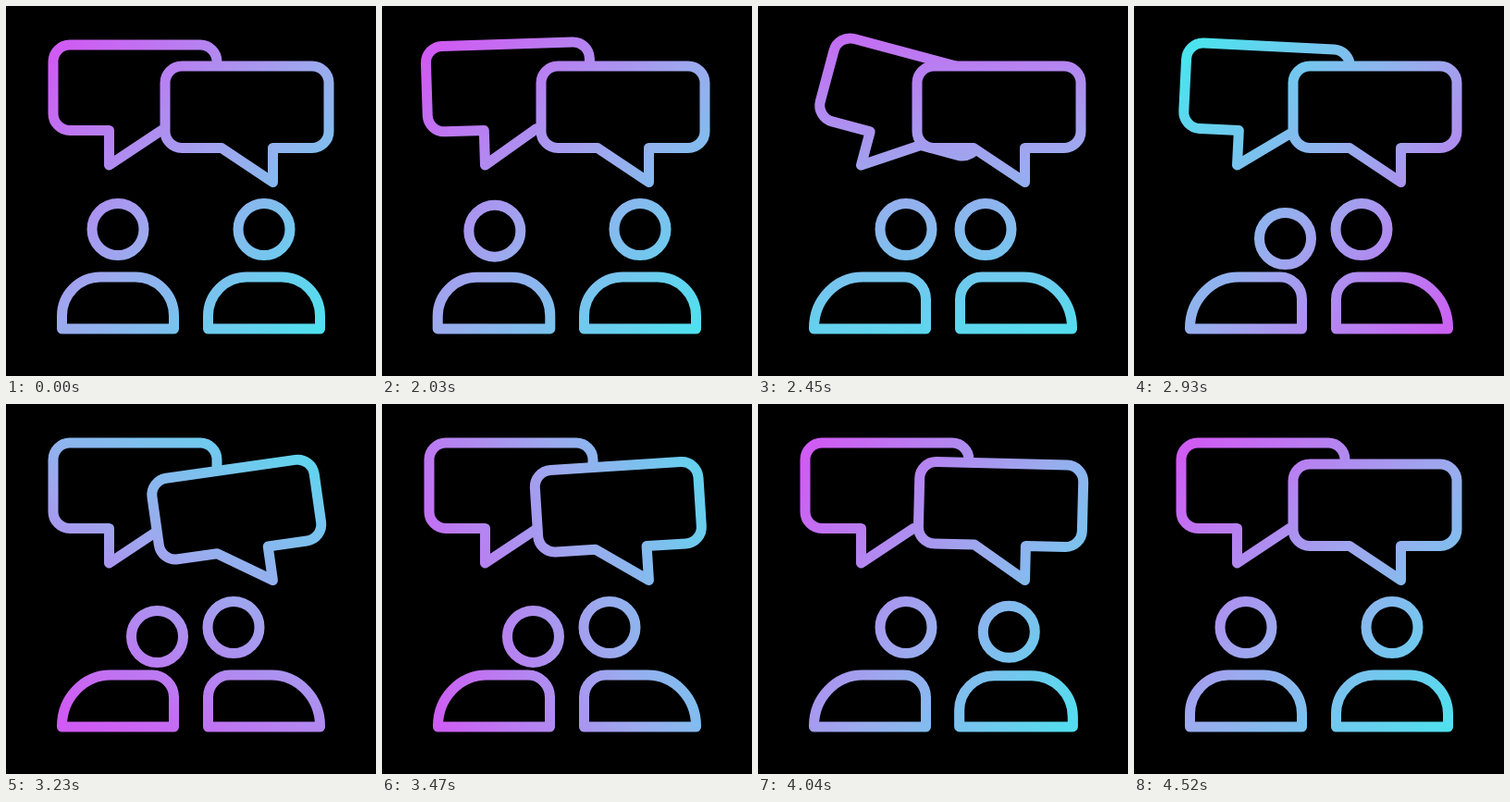
Write an HTML page without scripts that moves like this. It is 400x400 px and loops after 4550 ms.

```html
<!DOCTYPE html>
<html lang="en">
<head>
<meta charset="utf-8">
<title>Conversation</title>
<style>
  html, body { margin: 0; width: 100%; height: 100%; overflow: hidden; background: #000; }
  svg { display: block; width: 100%; height: 100%; }

  .lines { fill: #000; stroke: #fff; stroke-width: 11; stroke-linecap: round; stroke-linejoin: round; }
  .lines *, .sheen { animation: 4.55s cubic-bezier(.37, 0, .63, 1) infinite backwards; }

  .sheen { rotate: 45deg; animation-name: turn; animation-timing-function: cubic-bezier(.38, 0, .3, 1); }

  .bubble { animation-name: swing; }
  .first { transform-origin: 111px 172px; }
  .second { transform-origin: 289px 191px; animation-delay: 1.15s; }

  .head, .body { transform-origin: 121px 349px; }
  .head { --lean: 39px; --dip: translateY(5.6px); }
  .right .head { --lean: 33px; }
  .body {
    --lean: 0px;
    --dip: scale(1.016, .985);
    --upright: path("M60.5 349V335C60.5 312 79 293 102 293H140C163 293 181.5 312 181.5 335V349Z");
    --leaned: path("M60.5 349V348C60.5 318 84 293 113 293H158C171 293 181.5 304 181.5 317V349Z");
    d: var(--upright);
  }
  .left .head, .left .body { animation-name: lean-left, dip-left; }
  .right .head, .right .body { animation-name: lean-right, dip-right; }
  .nod { animation-name: nod; }

  @keyframes turn {
    0%, 43.96% { rotate: 45deg; }
    98.9%, 100% { rotate: 405deg; }
  }
  @keyframes swing {
    0%, 43.74% { rotate: 0deg; }
    48.35% { rotate: -20.5deg; }
    53.85% { rotate: 15deg; }
    59.34% { rotate: -9deg; }
    64.84% { rotate: 3deg; }
    69.23%, 100% { rotate: 0deg; }
  }
  @keyframes lean-left {
    0%, 43.74%, 98.46%, 100% { translate: 0px; d: var(--upright); }
    53.19%, 89.23% { translate: var(--lean); d: var(--leaned); }
  }
  @keyframes lean-right {
    0%, 44.62%, 91.65%, 100% { translate: 0px; d: var(--upright); }
    53.63%, 82.86% { translate: var(--lean); d: var(--leaned); }
  }
  /* Half a sine arch: slow down into the dip, speed up out of it. */
  @keyframes dip-left {
    0%, 43.74%, 53.19%, 89.23%, 98.46%, 100% { transform: none; animation-timing-function: cubic-bezier(.39, .575, .565, 1); }
    48.46%, 93.85% { transform: var(--dip); animation-timing-function: cubic-bezier(.47, 0, .745, .715); }
  }
  @keyframes dip-right {
    0%, 44.62%, 53.63%, 82.86%, 91.65%, 100% { transform: none; animation-timing-function: cubic-bezier(.39, .575, .565, 1); }
    49.12%, 87.25% { transform: var(--dip); animation-timing-function: cubic-bezier(.47, 0, .745, .715); }
  }
  @keyframes nod {
    0%, 56.26%, 82.86%, 100% { translate: 0px 0px; }
    62.86%, 75.82% { translate: 3.5px 10px; }
  }
</style>
</head>
<body>
<svg viewBox="0 0 400 400">
  <defs>
    <linearGradient id="hues" gradientUnits="userSpaceOnUse" x1="-210" x2="210" y1="0" y2="0">
      <stop offset="0" stop-color="#cf5cf3"/>
      <stop offset=".5" stop-color="#9caaee"/>
      <stop offset="1" stop-color="#4ce3ee"/>
    </linearGradient>
    <mask id="drawing" maskUnits="userSpaceOnUse" x="0" y="0" width="400" height="400">
      <g class="lines">
        <path class="bubble first" d="M69 42H210A18 18 0 0 1 228 60V116.500A18 18 0 0 1 210 134.500H168L111.500 172V134.500H69A18 18 0 0 1 51 116.500V60A18 18 0 0 1 69 42Z"/>
        <path class="bubble second" d="M190 65H331A18 18 0 0 1 349 83V135.500A18 18 0 0 1 331 153.500H288.500V190.500L233 153.500H190A18 18 0 0 1 172 135.500V83A18 18 0 0 1 190 65Z"/>
        <g class="left">
          <path class="body" d="M60.500 349V335C60.500 312 79 293 102 293H140C163 293 181.500 312 181.500 335V349Z"/>
          <g class="nod"><circle class="head" cx="121" cy="241.500" r="28"/></g>
        </g>
        <g class="right" transform="translate(400) scale(-1 1)">
          <path class="body" d="M60.500 349V335C60.500 312 79 293 102 293H140C163 293 181.500 312 181.500 335V349Z"/>
          <circle class="head" cx="121" cy="241.500" r="28"/>
        </g>
      </g>
    </mask>
  </defs>
  <g mask="url(#drawing)">
    <g transform="translate(225 180)">
      <rect class="sheen" x="-500" y="-500" width="1000" height="1000" fill="url(#hues)"/>
    </g>
  </g>
</svg>
</body>
</html>
```
